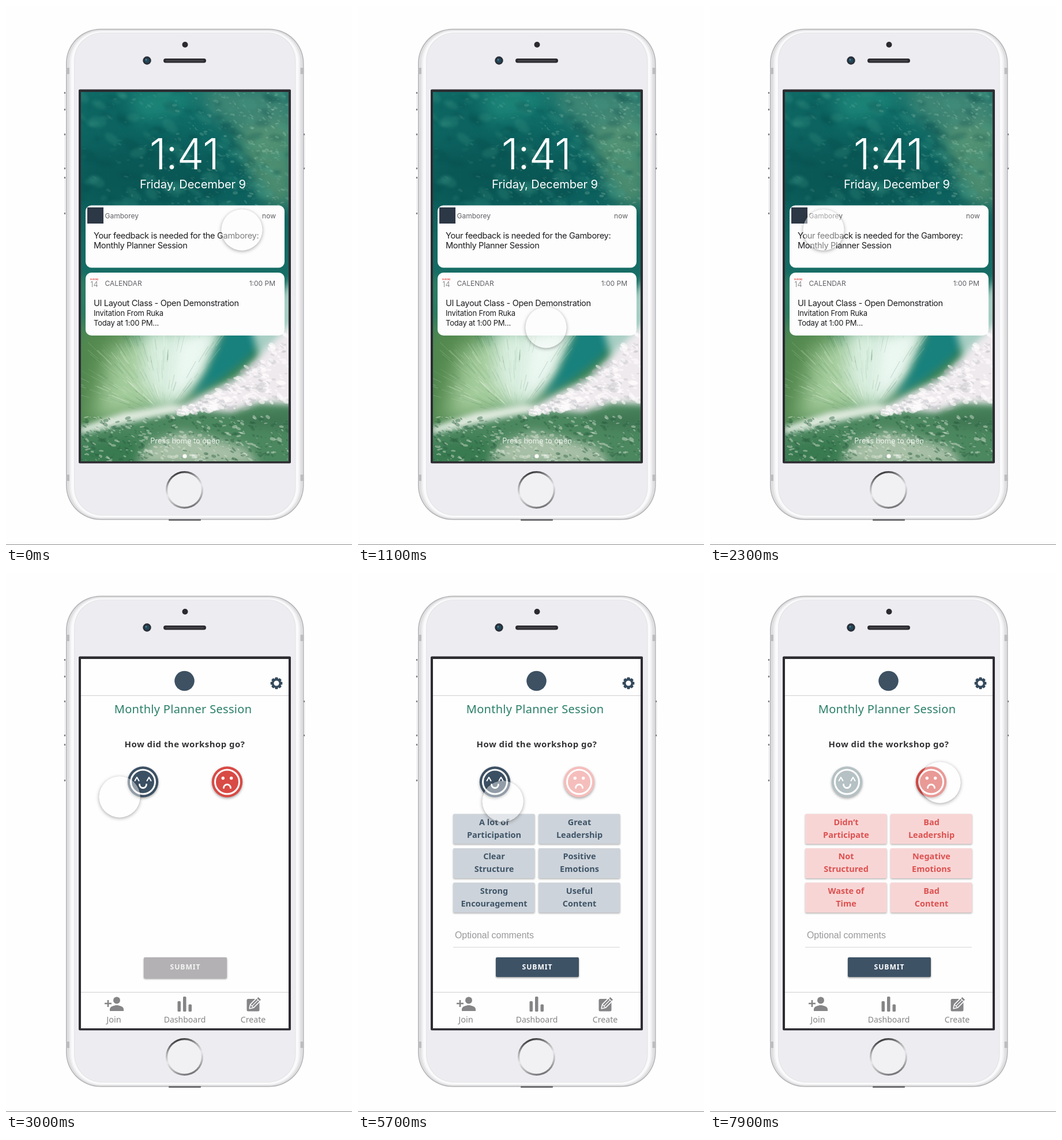
An HTML page with a canvas for the animation above (8 s loop, 600 px wide and 934 px high).

```html
<!DOCTYPE html>
<html lang="en">
<head>
<meta charset="utf-8">
<title>Feedback app</title>
<style>
html, body { margin: 0; width: 100%; height: 100%; overflow: hidden; background: #fefefe; }
canvas { display: block; width: 600px; height: 934px; }
</style>
</head>
<body>
<canvas id="stage" width="600" height="934"></canvas>
<script>
const W = 600, H = 934, LOOP = 8000, STEP = 100;
const OPEN = 2900, HAPPY = 5200, SAD = 7500;
const NAVY = '#3c5063', RED = '#d94a45', GREY = '#858587';
const UI = 'Inter, "Open Sans", sans-serif';
const APP = '"Noto Sans", "Open Sans", sans-serif';
const EVENT = 'Monthly Planner Session';

const stage = document.getElementById('stage').getContext('2d');
let g = stage;

function rect(x, y, w, h, r, color) {
  g.beginPath();
  g.roundRect(x, y, w, h, r);
  g.fillStyle = color;
  g.fill();
}

function disc(x, y, r, color) {
  g.beginPath();
  g.arc(x, y, r, 0, Math.PI * 2);
  g.fillStyle = color;
  g.fill();
}

function line(d, color, width) {
  g.strokeStyle = color;
  g.lineWidth = width;
  g.stroke(new Path2D(d));
}

function text(s, x, y, size, color, o = {}) {
  g.font = `${o.weight || 400} ${size}px ${o.font || UI}`;
  g.letterSpacing = (o.gap || 0) + 'px';
  g.textAlign = o.align || 'left';
  g.fillStyle = color;
  g.fillText(s, x, y);
}

function shadow(color, blur, dy) {
  g.shadowColor = color;
  g.shadowBlur = blur;
  g.shadowOffsetY = dy;
}
const noShadow = () => shadow('transparent', 0, 0);

function gradient(x0, y0, x1, y1, ...colors) {
  const grad = g.createLinearGradient(x0, y0, x1, y1);
  colors.forEach((c, i) => grad.addColorStop(i / (colors.length - 1), c));
  return grad;
}

function layer(draw) {
  const c = document.createElement('canvas');
  c.width = W;
  c.height = H;
  g = c.getContext('2d');
  draw();
  g = stage;
  return c;
}

function drawPhone() {
  g.fillStyle = '#fefefe';
  g.fillRect(0, 0, W, H);
  g.fillStyle = '#8e8e8e';
  g.fillRect(0, 933, W, 1);

  // side keys
  for (const [x, y, h] of [[101, 149, 32], [101, 221, 62], [101, 296, 65], [516, 221, 62]]) {
    rect(x, y, 3, h, 1, '#f0f0f1');
    g.fillStyle = '#77777a';
    g.fillRect(x, y, 2, 3);
    g.fillRect(x, y + h - 3, 2, 3);
  }

  rect(104, 39.5, 412.5, 851, 60, '#b4b4b6');
  rect(105.5, 41, 409.5, 848, 58.5, '#dfdfe1');
  g.fillStyle = '#bcbcbf';
  for (const y of [107, 812]) {
    g.fillRect(104, y, 7, 11);
    g.fillRect(509.5, y, 7, 11);
  }
  rect(110, 42.5, 400.5, 845, 55, '#efeff1');
  rect(113, 44, 394.5, 842, 53, '#fafafb');
  rect(118, 46, 384.5, 837, 49, '#e6e5e9');
  rect(119.5, 47, 381.5, 835, 48, '#edecf0');
  rect(282, 889, 56, 3, 1, '#6d6d70');

  disc(310.5, 67, 5, '#2b2a2e');
  disc(244.5, 94.5, 7.2, '#2b2f38');
  disc(244.5, 94.5, 4, '#1f4a5c');
  disc(243, 93, 1.5, '#5b7c8c');
  rect(273, 91, 74, 7.5, 3.7, '#2c2b30');
  rect(277, 93.5, 66, 2.5, 1, '#45444a');

  disc(309.5, 838.5, 32.5, gradient(300, 808, 320, 870, '#3c3c3e', '#a9a9ac', '#e8e8ea', '#b4b4b6', '#6d6d70'));
  disc(309.5, 838.5, 29.3, '#f1f0f3');
  rect(126, 144.5, 368, 648, 2, '#2c2c31');
}

function drawSea() {
  let seed = 7;
  const rnd = () => (seed = (seed * 16807) % 2147483647) / 2147483647;
  const soft = (d, color, blur) => {
    g.filter = `blur(${blur}px)`;
    g.fillStyle = color;
    g.fill(new Path2D(d));
    g.filter = 'none';
  };
  // slanted flecks; spot() gives place, size and colour
  const flecks = (count, spot) => {
    for (let i = 0; i < count; i++) {
      const [x, y, r, color] = spot();
      g.beginPath();
      g.ellipse(x, y, r, r * (0.25 + 0.4 * rnd()), rnd() * 1.2 - 0.3, 0, Math.PI * 2);
      g.fillStyle = color;
      g.fill();
    }
  };
  g.save();
  g.beginPath();
  g.rect(130, 149, 360, 640);
  g.clip();
  g.fillStyle = gradient(130, 149, 130, 789, '#11706a', '#0b5f5d', '#176e66', '#3f8558', '#46845a');
  g.fillRect(130, 149, 360, 640);

  // open water
  soft('M130 149H210L230 210L180 260L130 240Z', '#0d6461', 14);
  soft('M215 149H330L300 185L230 200Z', 'rgba(34,140,126,.75)', 14);
  soft('M130 250L300 230L380 290L350 345H130Z', '#0a5856', 20);
  soft('M330 140H500V215L430 240L360 190Z', 'rgba(96,150,126,.6)', 16);
  soft('M400 215L500 200V350L450 340L420 280Z', 'rgba(104,160,120,.7)', 14);
  g.filter = 'blur(2.5px)';
  flecks(150, () => {
    const x = 130 + rnd() * 360, y = 149 + rnd() * 200;
    return [x, y, 4 + rnd() * 13, rnd() < 0.5 ? 'rgba(4,72,72,.25)' : 'rgba(70,160,142,.22)'];
  });
  g.filter = 'none';
  flecks(520, () => {
    const x = 130 + 360 * Math.sqrt(rnd()), y = 149 + rnd() * 200;
    const glow = 0.06 + 0.26 * rnd() * (x - 110) / 380;
    return [x, y, 0.8 + rnd() * 3.6, `rgba(170,212,190,${glow.toFixed(3)})`];
  });

  // wave face
  soft('M120 470H150V580L125 590Z', '#2c7d62', 8);
  soft('M120 555L215 550L235 700L120 735Z', '#54894e', 14);
  soft('M185 590L270 560L300 690L150 720Z', '#a4cc9c', 18);
  soft('M240 560L375 555L345 640L275 698L235 650Z', '#d9eee0', 15);
  soft('M300 580L370 560L330 655L285 690Z', 'rgba(240,250,247,.8)', 10);
  soft('M385 555L455 555L425 605L375 645L320 678L345 640Z', '#18817d', 7);
  soft('M425 560L500 470V600L440 610Z', '#a9cfc4', 7);
  g.lineCap = 'round';
  for (let i = 0; i < 260; i++) {
    const a = Math.PI * (1.08 + 0.64 * rnd()), r = 25 + rnd() * 130, n = 8 + rnd() * 28;
    const c = Math.cos(a), s = Math.sin(a);
    g.strokeStyle = rnd() < 0.6 ? `rgba(240,250,232,${0.08 + 0.2 * rnd()})` : `rgba(50,110,70,${0.05 + 0.14 * rnd()})`;
    g.lineWidth = 0.7 + rnd();
    g.beginPath();
    g.moveTo(275 + c * r, 712 + s * r);
    g.lineTo(275 + c * (r + n), 712 + s * (r + n));
    g.stroke();
  }

  // near water
  soft('M120 738L220 712L320 698L500 688V800H120Z', '#4b875f', 6);
  soft('M120 765L220 745L240 800H120Z', '#397a50', 10);
  soft('M128 730L205 704L290 690L330 700L260 712L130 742Z', 'rgba(234,242,232,.9)', 5);
  soft('M225 795L250 758L305 738L370 752L415 765L440 795Z', 'rgba(190,205,184,.8)', 9);
  soft('M390 715L495 700V735L430 730Z', 'rgba(60,115,80,.7)', 7);
  flecks(480, () => {
    const x = 130 + rnd() * 360, y = 712 + rnd() * 77;
    const nearFoam = Math.abs(x - 325) < 95 && y > 735;
    return [x, y, 1 + rnd() * 4, rnd() < (nearFoam ? 0.55 : 0.45) ? 'rgba(226,234,220,.42)' : 'rgba(44,96,64,.42)'];
  });

  // breaking crest
  soft('M290 702L345 672L400 645L445 600L500 545V690L440 688L390 704L340 700Z', '#efeaee', 6);
  flecks(300, () => {
    const u = rnd(), top = 700 - 145 * Math.pow(u, 1.3);
    const y = top + (702 - 18 * u - top) * rnd() + rnd() * 8;
    return [298 + u * 192, y, 2 + rnd() * 6, rnd() < 0.68 ? 'rgba(255,252,254,.6)' : 'rgba(178,182,184,.3)'];
  });
  g.restore();
}

function drawLock() {
  drawPhone();
  drawSea();
  text('1:41', 309, 283, 74, '#fff', { weight: 350, align: 'center', gap: -1 });
  text('Friday, December 9', 324, 316, 20.2, '#fff', { align: 'center', gap: -0.15 });

  rect(138, 345.5, 345, 108, 10, '#fdfdfe');
  rect(138, 462, 345, 109, 10, '#fdfdfe');
  const body = { gap: -0.35 }, small = { gap: -0.2 };

  rect(141, 349, 28, 28, 0, '#2d3846');
  text('Gamborey', 171.5, 368, 12, '#606064');
  text('now', 468, 368, 12, '#606064', { align: 'right' });
  text('Your feedback is needed for the Gamborey:', 152, 403, 14.6, '#1c1c1e', body);
  text(EVENT, 152, 420, 14.6, '#1c1c1e', body);

  text('Sunday', 153, 475, 4, '#e0504a', { weight: 600, align: 'center' });
  text('14', 153, 487, 13, '#77777a', { weight: 300, align: 'center' });
  text('CALENDAR', 171.5, 485, 12, '#606064');
  text('1:00 PM', 467, 485, 12, '#606064', { align: 'right' });
  text('UI Layout Class - Open Demonstration', 152, 520, 14.6, '#1c1c1e', body);
  text('Invitation From Ruka', 152, 537, 13, '#1c1c1e', small);
  text('Today at 1:00 PM...', 152, 554, 13, '#1c1c1e', small);

  text('Press home to open', 310.5, 758, 12.8, 'rgba(255,255,255,.85)', { align: 'center' });
  disc(296, 780, 3, 'rgba(255,255,255,.35)');
  disc(310, 780, 3.6, '#fff');
  rect(322, 777, 10, 7, 2, 'rgba(255,255,255,.35)');
}

function drawGear(x, y) {
  g.save();
  g.translate(x, y);
  for (let i = 0; i < 8; i++) {
    g.rotate(Math.PI / 4);
    rect(-2.6, -10.3, 5.2, 5, 1.2, '#34495c');
  }
  g.restore();
  disc(x, y, 8.3, '#34495c');
  disc(x, y, 4.6, '#fefefe');
}

function drawNav() {
  const label = { font: APP, align: 'center' };
  g.fillStyle = '#cfcfd2';
  g.fillRect(130, 726, 360, 1);

  line('M171 746H183M177 740V752', GREY, 2.6);
  disc(192, 740.5, 6, GREY);
  g.fillStyle = GREY;
  g.fill(new Path2D('M180 759V756C180 751 188 749 192 749S204 751 204 756V759Z'));
  text('Join', 187, 779, 14.6, GREY, label);

  rect(297.5, 742, 5.5, 18, 1.5, GREY);
  rect(307, 734, 5.5, 26, 1.5, GREY);
  rect(316.5, 747.5, 5.5, 12.5, 1.5, GREY);
  text('Dashboard', 310, 779, 14, GREY, label);

  rect(417.5, 738, 22, 21.5, 2.5, GREY);
  g.fillStyle = GREY;
  g.lineJoin = 'round';
  const pencil = 'M423 754L424.5 748L437.5 735L442 739.5L429 752.5Z';
  line(pencil, '#fefefe', 3.2);
  g.fill(new Path2D(pencil));
  line('M426 751L437 740M424.5 748.5L428.5 752.5M435 737.5L439.5 742', '#fefefe', 1.2);
  text('Create', 428.5, 779, 14.2, GREY, label);
}

function drawHome() {
  drawPhone();
  g.fillStyle = '#fefefe';
  g.fillRect(130, 149, 360, 640);
  disc(309.5, 187, 17.3, '#3d5163');
  drawGear(469, 191);
  g.fillStyle = '#cfcfd2';
  g.fillRect(130, 212, 360, 1);
  text(EVENT, 307, 243, 20, '#2a7f68', { font: APP, align: 'center', gap: 0.3 });
  text('How did the workshop go?', 310, 302, 15, '#333336', { font: APP, weight: 700, align: 'center', gap: 0.45 });
  drawNav();
}

function face(x, color, happy) {
  const y = 362;
  shadow('rgba(0,0,0,.35)', 4, 2);
  disc(x, y, 26.7, color);
  noShadow();
  g.beginPath();
  g.arc(x, y, 21, 0, Math.PI * 2);
  g.strokeStyle = '#fff';
  g.lineWidth = 3;
  g.stroke();
  g.save();
  g.translate(x, y);
  g.lineCap = 'round';
  g.lineJoin = 'round';
  if (happy) {
    line('M-14 -2L-10.5 -8L-7 -2M7 -2L10.5 -8L14 -2', '#fff', 2);
    line('M-6 4.5A6 6 0 0 0 6 4.5', '#fff', 2.8);
  } else {
    disc(-7.2, -6.5, 2.7, '#fff');
    disc(7.2, -6.5, 2.7, '#fff');
    line('M-6 10.5A6 6 0 0 1 6 10.5', '#fff', 2.8);
  }
  g.restore();
}

const PRAISE = ['A lot of/Participation', 'Great/Leadership', 'Clear/Structure',
  'Positive/Emotions', 'Strong/Encouragement', 'Useful/Content'];
const BLAME = ['Didn’t/Participate', 'Bad/Leadership', 'Not/Structured',
  'Negative/Emotions', 'Waste of/Time', 'Bad/Content'];

function drawChoices(words, fill, ink) {
  words.forEach((pair, i) => {
    const x = 165 + (i % 2) * 148, y = 417.5 + (i >> 1) * 59.5;
    shadow('rgba(0,0,0,.3)', 3, 1.5);
    rect(x, y, 141.5, 52, 2, fill);
    noShadow();
    pair.split('/').forEach((s, row) =>
      text(s, x + 71, y + 19 + row * 22, 14.5, ink, { font: APP, weight: 700, align: 'center' }));
  });
  text('Optional comments', 168, 632.5, 15.9, '#98989b', { font: '"Liberation Sans", Arial, sans-serif' });
  g.fillStyle = '#d6d6d9';
  g.fillRect(165, 648, 289, 1);
}

function drawApp(t) {
  const chosen = t >= HAPPY, sad = t >= SAD;
  face(237.5, sad ? '#b5c1c4' : NAVY, true);
  face(383.5, chosen && !sad ? '#f5bebc' : RED, false);
  if (sad) drawChoices(BLAME, '#f8d5d5', '#dc5150');
  else if (chosen) drawChoices(PRAISE, '#cdd3da', '#3f5568');
  shadow('rgba(0,0,0,.4)', 3, 1.5);
  rect(239, 666, 144, chosen ? 34 : 36, 2, chosen ? '#3e5266' : '#b3b1b3');
  noShadow();
  text('SUBMIT', 311, 687, 12.2, chosen ? '#fff' : '#f4f4f4', { font: APP, weight: 700, align: 'center', gap: 0.9 });
}

// touch path: time, x, y
const PATH = [[0, 409, 388], [1100, 326, 557], [2200, 197, 388], [3900, 197, 388],
  [4700, 248, 388], [5500, 248, 388], [6500, 300, 462], [7400, 399, 363], [8000, 399, 363]];

function slope(i, k) {
  const a = PATH[i - 1], b = PATH[i], c = PATH[i + 1];
  if (!a || !c) return 0;
  const l = (b[k] - a[k]) / (b[0] - a[0]), r = (c[k] - b[k]) / (c[0] - b[0]);
  return l * r <= 0 ? 0 : 2 * l * r / (l + r);
}

function touchAt(t) {
  let i = 0;
  while (i < PATH.length - 2 && t >= PATH[i + 1][0]) i++;
  const a = PATH[i], b = PATH[i + 1], d = b[0] - a[0], u = (t - a[0]) / d;
  return [1, 2].map(k => {
    const s = u * u * (3 - 2 * u);
    return a[k] + (b[k] - a[k]) * s
      + d * slope(i, k) * u * (1 - u) * (1 - u)
      - d * slope(i + 1, k) * u * u * (1 - u);
  });
}

function drawTouch(x, y) {
  const r = 35.5;
  g.save();
  g.beginPath();
  g.rect(0, 0, W, H);
  g.arc(x, y, r, 0, Math.PI * 2);
  g.clip('evenodd');
  shadow('rgba(0,0,0,.36)', 6, 1.5);
  disc(x, y, r, '#fff');
  g.restore();
  disc(x, y, r, 'rgba(253,253,253,.44)');
}

const lock = layer(drawLock), home = layer(drawHome);

function frame(now) {
  const t = Math.floor((now % LOOP) / STEP) * STEP;
  g.drawImage(t < OPEN ? lock : home, 0, 0);
  if (t >= OPEN) drawApp(t);
  drawTouch(...touchAt(t));
  requestAnimationFrame(frame);
}
requestAnimationFrame(frame);
</script>
</body>
</html>
```
